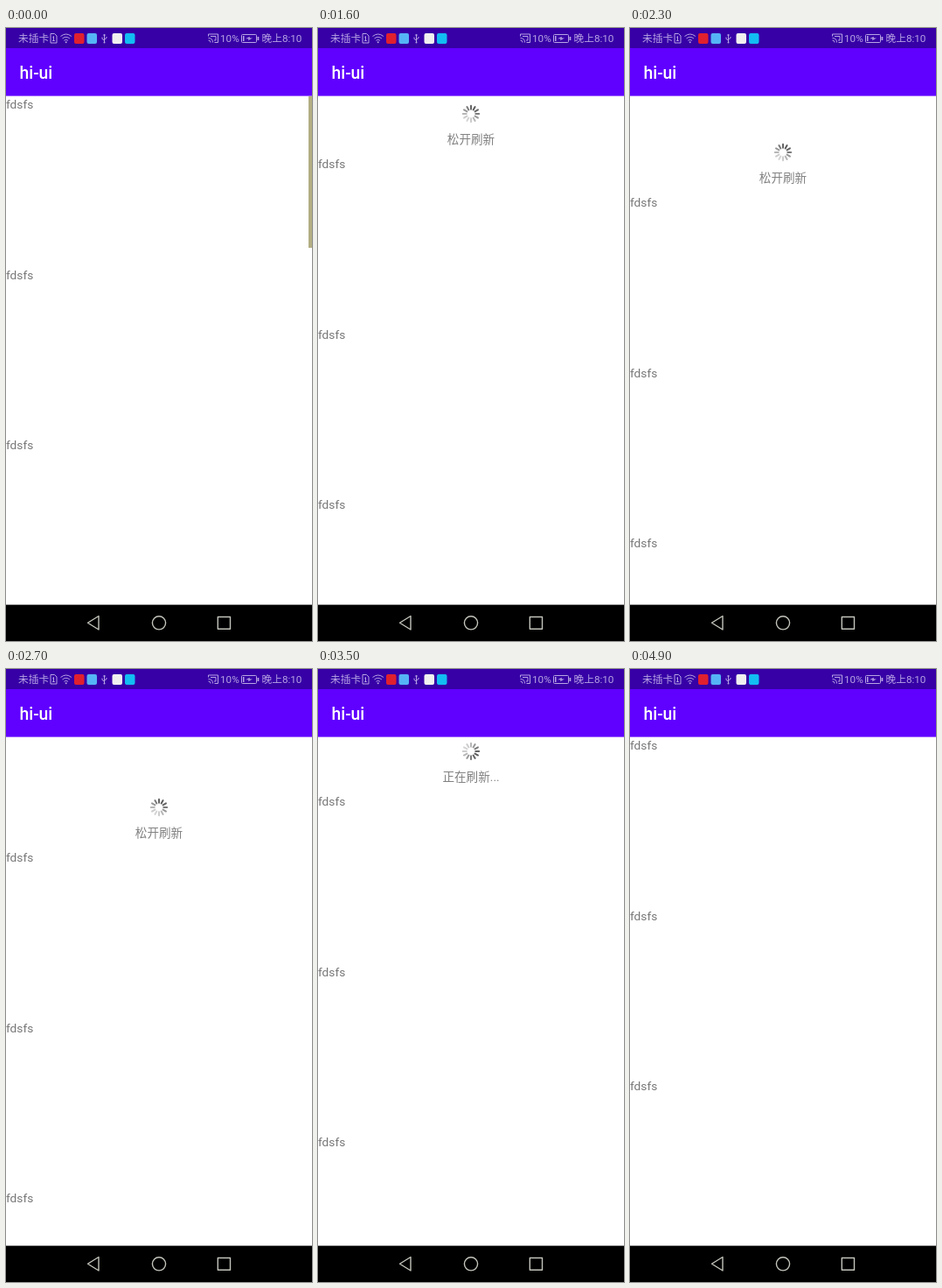
Animation of 350 by 700 pixels, one loop 5 s. Source, as an HTML page:

```html
<!DOCTYPE html>
<html lang="zh">
<head>
<meta charset="utf-8">
<title>hi-ui</title>
<style>
  html, body { margin: 0; width: 100%; height: 100%; overflow: hidden; background: #fff; }
  svg { display: block; width: 350px; height: 700px; }
  text { font-family: Roboto, "Noto Sans CJK SC", "Noto Sans CJK", sans-serif; }
  .body text { font-size: 13.7px; fill: #777; }
  .body .hint text { font-size: 13.6px; fill: #808080; text-anchor: middle; }
  .status text { font-size: 11.7px; fill: #b8a4e4; }
  .line { fill: none; stroke: #b8a4e4; stroke-width: 1; }
  .solid { fill: #b8a4e4; }
  .nav { fill: none; stroke: #c4c4bc; stroke-width: 1.4; stroke-linejoin: round; }

  /* Motion advances in 100 ms ticks (2% of the loop). */
  .pull, .spin, .bar, .hint text { animation: 5s step-end infinite; }
  .pull { animation-name: pull; }
  .spin { animation-name: spin; }
  .bar { animation-name: fade; }
  .hint .down { animation-name: down; }
  .hint .release { animation-name: release; }
  .hint .busy { animation-name: busy; }

  @keyframes pull {
    0% { transform: translateY(0); }
    18% { transform: translateY(4px); animation-timing-function: steps(7); }
    32% { transform: translateY(68px); animation-timing-function: steps(7); }
    46% { transform: translateY(112px); animation-timing-function: steps(4); }
    54% { transform: translateY(128px); animation-timing-function: steps(2); }
    58% { transform: translateY(133px); }
    60% { transform: translateY(131px); }
    62% { transform: translateY(118px); }
    64% { transform: translateY(98px); }
    66% { transform: translateY(80px); }
    68% { transform: translateY(69px); }
    70% { transform: translateY(64px); }
    72% { transform: translateY(62px); }
    74% { transform: translateY(60.5px); }
    90% { transform: translateY(47px); }
    92% { transform: translateY(28px); }
    94% { transform: translateY(13px); }
    96% { transform: translateY(4px); }
    98%, 100% { transform: translateY(0); }
  }
  @keyframes spin {
    0% { transform: rotate(0deg); }
    66% { transform: rotate(18deg); animation-timing-function: steps(12); }
    90% { transform: rotate(450deg); }
    92%, 100% { transform: rotate(0deg); }
  }
  @keyframes fade {
    0% { opacity: 1; }
    18% { opacity: .75; animation-timing-function: steps(3); }
    24%, 100% { opacity: 0; }
  }
  @keyframes down { 0% { opacity: 1; } 30%, 100% { opacity: 0; } }
  @keyframes release { 0% { opacity: 0; } 30% { opacity: 1; } 66%, 100% { opacity: 0; } }
  @keyframes busy { 0% { opacity: 0; } 66%, 100% { opacity: 1; } }
</style>
</head>
<body>
<svg viewBox="0 0 350 700">
  <rect width="350" height="700" fill="#fff"/>

  <g class="body">
    <g class="pull">
      <g transform="translate(175 30)"><g class="spin" id="spinner"></g></g>
      <g class="hint">
        <text class="down" x="175" y="64.2">下拉刷新</text>
        <text class="release" x="175" y="64.2">松开刷新</text>
        <text class="busy" x="175" y="64.2">正在刷新...</text>
      </g>
      <text x="0" y="92.2">fdsfs</text>
      <text x="0" y="286.6">fdsfs</text>
      <text x="0" y="481">fdsfs</text>
    </g>
    <rect class="bar" x="346" y="78" width="4" height="173" fill="#b3ae82"/>
  </g>

  <rect y="23" width="350" height="54.6" fill="#6000ff"/>
  <text x="15.5" y="57.7" font-size="19.4" font-weight="500" fill="#fff">hi-ui</text>

  <g class="status">
    <rect width="350" height="23" fill="#3600a6"/>
    <text x="14" y="16.2">未插卡</text>
    <path class="line" d="M51 6.5h4.5l2.5 2.5v8h-7zM54.5 9.5v5M53.5 10.5l1-1M53.2 14.5h2.6"/>
    <path class="line" d="M62.5 9.5q6.2-5 12.4 0M64.5 12q4.2-3.4 8.4 0M66.5 14.3q2.2-1.8 4.4 0"/>
    <circle class="solid" cx="68.7" cy="16.2" r="1"/>
    <rect x="78" y="6" width="11.5" height="12" rx="2" fill="#e0202e"/>
    <rect x="92.5" y="6" width="11.5" height="12" rx="2" fill="#55b4f5"/>
    <path class="line" d="M112.5 7.5v9M110 10.5v2l2.5 1.5M115 10v1.500l-2.500 1.500M111.300 8.500l1.200-1.500 1.200 1.500"/>
    <circle class="solid" cx="112.5" cy="16.500" r="1"/>
    <rect x="121.5" y="6" width="11.5" height="12" rx="2" fill="#f0f0f0"/>
    <rect x="136" y="6" width="11.5" height="12" rx="2" fill="#12bdf2"/>
    <path class="line" d="M231.5 9.5V7h11v9.5h-4M231.5 11.5q5 0 5 5M231.5 14q2.5 0 2.5 2.5M234 9.5h6V14h-2"/>
    <text x="245" y="16.2">10%</text>
    <rect class="line" x="269.5" y="7.500" width="17" height="9" rx="1"/>
    <path class="solid" d="M287.5 10h1.800v4h-1.800zM271 9h1.500v6h-1.500zM274 12.300l5-2.500-.5 1.700h3.500l-5 2.700.5-1.900z"/>
    <text x="292.5" y="16.2">晚上8:10</text>
  </g>

  <rect y="658.6" width="350" height="41.4" fill="#000"/>
  <g class="nav">
    <path d="M106 671.5V687l-12.500-7.750z"/>
    <circle cx="175" cy="679.3" r="7.600"/>
    <rect x="242.300" y="672.500" width="14.200" height="13.700"/>
  </g>
</svg>
<script>
  const spinner = document.getElementById('spinner');
  const spokes = 12;
  for (let i = 0; i < spokes; i++) {
    const spoke = document.createElementNS('http://www.w3.org/2000/svg', 'path');
    // Darkest near one o'clock, palest opposite.
    const shade = .6 + .35 * Math.cos((i - 1) * 2 * Math.PI / spokes);
    spoke.setAttribute('d', 'M0-5.3V-9.2');
    spoke.setAttribute('stroke', '#555');
    spoke.setAttribute('stroke-width', 2);
    spoke.setAttribute('stroke-linecap', 'round');
    spoke.setAttribute('opacity', shade);
    spoke.setAttribute('transform', `rotate(${i * 360 / spokes})`);
    spinner.append(spoke);
  }
</script>
</body>
</html>
```
